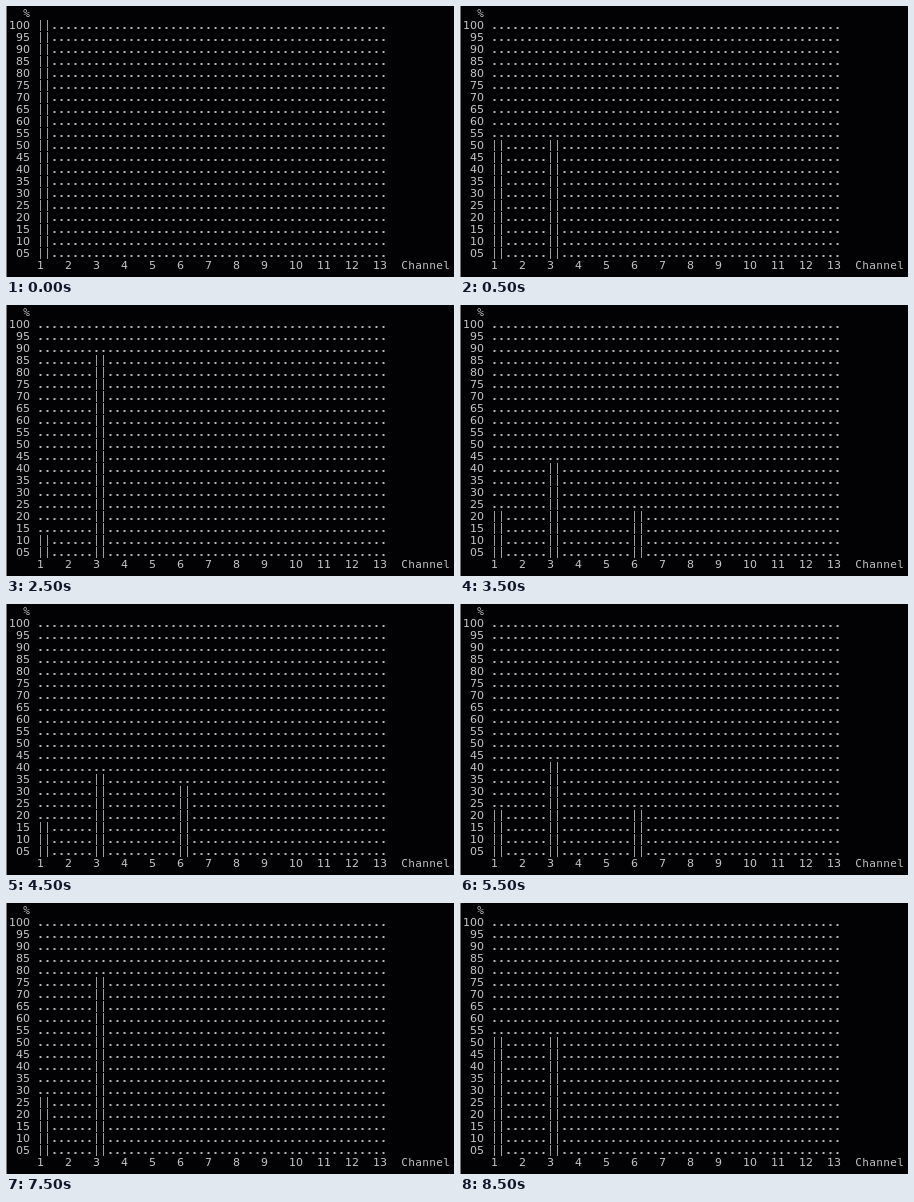
An HTML page with a canvas that plays this animation: 448 px wide and 271 px high, repeating every 9000 ms.

```html
<!DOCTYPE html>
<html lang="en">
<head>
<meta charset="utf-8">
<title>Channel usage</title>
<style>
  html, body { margin: 0; width: 100%; height: 100%; overflow: hidden; background: #020104; }
  canvas { display: block; }
</style>
</head>
<body>
<canvas id="stage" width="448" height="271"></canvas>
<script>
const ctx = document.getElementById('stage').getContext('2d');

const CELL = 7, LINE = 12, LEFT = 34, COLUMNS = 50, CHANNELS = 13;
const STEP_MS = 500;
const DIGITS = '11px "DejaVu Sans", sans-serif';
const LETTERS = '11px "DejaVu Sans Mono", monospace';

// Percentage per channel; the sequence plays forwards, then backwards.
const states = [
  { 1: 100 },
  { 1: 50, 3: 50 },
  { 1: 30, 3: 65 },
  { 1: 25, 3: 75 },
  { 1: 20, 3: 80 },
  { 1: 10, 3: 85 },
  { 1: 20, 3: 60, 6: 20 },
  { 1: 20, 3: 40, 6: 20 },
  { 1: 20, 3: 40, 6: 25 },
  { 1: 15, 3: 35, 6: 30 }
];

const cellX = column => LEFT + column * CELL;
const baseline = line => 11 + line * LINE;

function write(text, column, line, font) {
  ctx.font = font;
  ctx.fillStyle = '#c4c4c4';
  [...text].forEach((char, i) => ctx.fillText(char, cellX(column + i) + 0.5, baseline(line)));
}

function drawRow(percent, line, state) {
  const label = String(percent).padStart(2, '0');
  write(label, -1 - label.length, line, DIGITS);
  for (let column = 0; column < COLUMNS; column++) {
    const channel = Math.floor(column / 4) + 1;
    const filled = column % 4 < 2 && (state[channel] || 0) >= percent;
    const x = cellX(column), y = baseline(line);
    if (filled) {
      ctx.fillStyle = '#a09c9c';
      ctx.fillRect(x, y - 9, 1, 11);
    } else {
      ctx.fillStyle = '#b4b4b0';
      ctx.fillRect(x - 0.5, y - 2, 2, 2);
    }
  }
}

function draw(state) {
  ctx.fillStyle = '#020104';
  ctx.fillRect(0, 0, 448, 271);
  ctx.fillStyle = '#77777a';
  ctx.fillRect(0, 0, 1, 271);
  ctx.textAlign = 'center';

  write('%', -2, 0, LETTERS);
  for (let line = 1; line <= 20; line++) drawRow(105 - line * 5, line, state);
  for (let n = 1; n <= CHANNELS; n++) write(String(n), (n - 1) * 4, 21, DIGITS);
  write('Channel', 52, 21, LETTERS);
}

function tick() {
  const last = states.length - 1;
  const step = Math.floor(performance.now() / STEP_MS) % (2 * last);
  draw(states[step <= last ? step : 2 * last - step]);
  requestAnimationFrame(tick);
}
tick();
</script>
</body>
</html>
```
